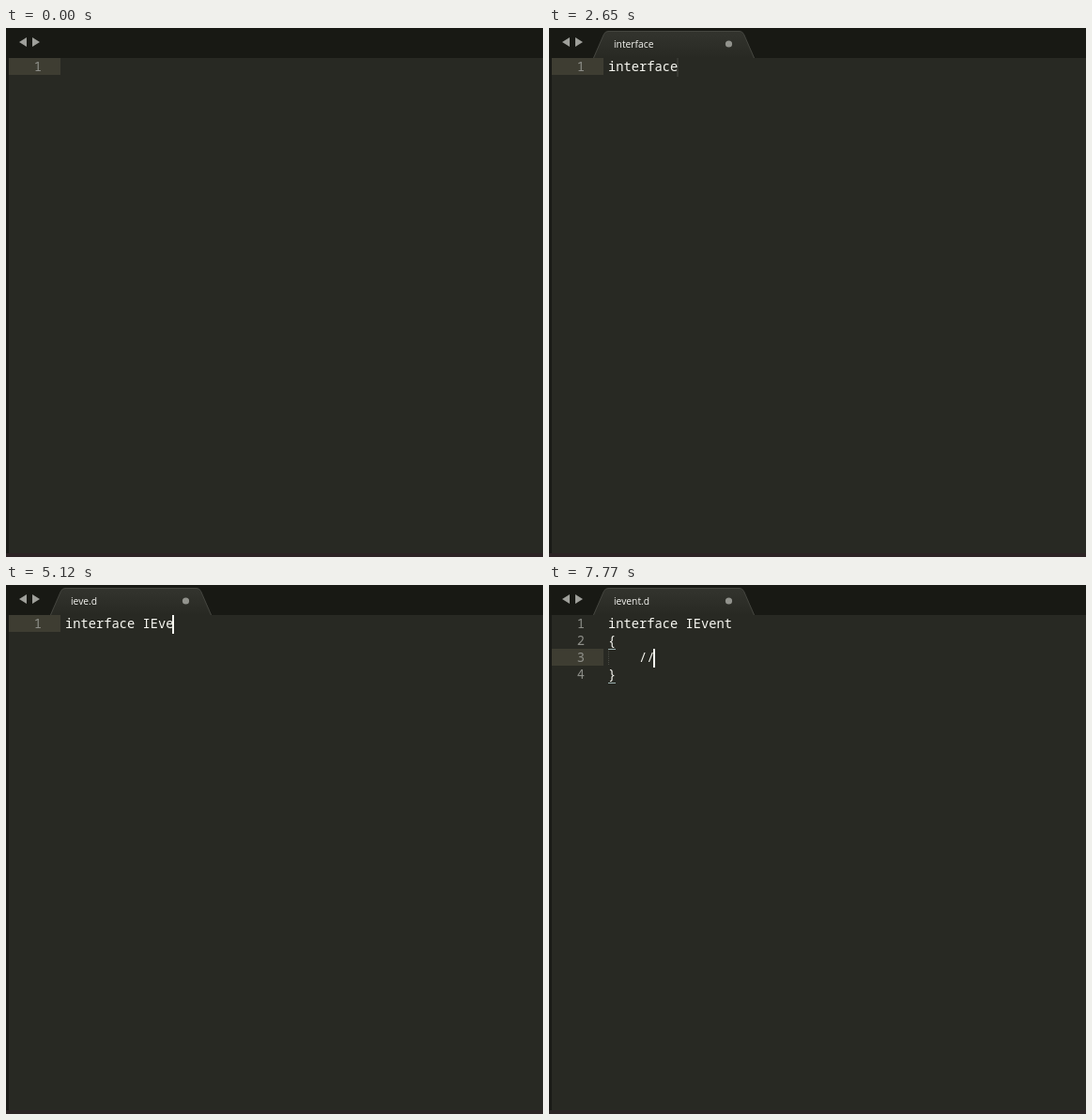
An HTML page for the animation above (8000 ms loop, 572 by 564 pixels).

```html
<!DOCTYPE html>
<html lang="en">
<head>
<meta charset="utf-8">
<title>Typing in an editor</title>
<style>
  html, body { margin: 0; width: 100%; height: 100%; overflow: hidden; background: #282923; }
  svg { display: block; width: 572px; height: 564px; }
  text { white-space: pre; }
  .code { font: 13.75px "Noto Sans Mono", "DejaVu Sans Mono", monospace; fill: #f8f8f2; }
  .num { fill: #8f908a; text-anchor: end; }
  .label { font: 10.3px "Open Sans", "Noto Sans", sans-serif; fill: #f4f4f0; }
</style>
</head>
<body>
<svg viewBox="0 0 572 564">
  <defs>
    <linearGradient id="tabFill" x1="0" y1="0" x2="0" y2="1">
      <stop offset="0" stop-color="#33342e"/>
      <stop offset="1" stop-color="#282923"/>
    </linearGradient>
  </defs>
  <rect width="572" height="564" fill="#282923"/>
  <rect width="572" height="32" fill="#181914"/>
  <rect y="32" width="3" height="532" fill="#1a1b17"/>
  <rect y="560" width="572" height="4" fill="#2c2324"/>
  <path d="M14 15L22 10V20ZM36 15L28 10V20Z" fill="#9fa09b"/>
  <g id="tab">
    <path d="M47 32L58.5 6.5Q60 3.5 63 3.5H203Q206 3.5 207.500 6.500L219 32Z" fill="url(#tabFill)"/>
    <path d="M47.500 32L58.500 6.500Q60 3.500 63 3.500H203Q206 3.500 207.500 6.500L218.500 32" fill="none" stroke="#44453f"/>
    <circle cx="191.500" cy="17" r="3.600" fill="#92938d"/>
    <text id="label" class="label" x="69" y="21"></text>
  </g>
  <rect id="active" x="3" width="55" height="18" fill="#3e3d32"/>
  <path id="guide" d="M63.5 68V86" stroke="#4a4b44" stroke-dasharray="1 1"/>
  <g id="rows"></g>
  <rect id="caret" width="2" height="20" fill="#f8f8f0"/>
</svg>
<script>
const LOOP = 8000, TOP = 32, LINE = 18, CHAR = 8.25, LEFT = 63;
const NS = "http://www.w3.org/2000/svg";
const $ = id => document.getElementById(id);

// Each edit: time, document, caret row, caret column.
const edits = [[0, "", 0, 0]];
const head = "interface IEvent";
const keyTimes = [80, 620, 920, 1080, 1230, 1550, 1780, 1940, 2100,
                  3430, 4030, 4740, 4970, 5120, 5350, 5520];
keyTimes.forEach((time, i) => edits.push([time, head.slice(0, i + 1), 0, i + 1]));
edits.push(
  [6210, head + "\n", 1, 0],
  [6610, head + "\n{}", 1, 1],
  [7220, head + "\n{\n    \n}", 2, 4],
  [7620, head + "\n{\n    /\n}", 2, 5],
  [7770, head + "\n{\n    //\n}", 2, 6]
);

// Caret blink: time since the last edit and opacity from then on.
const blink = [[0, 1], [370, 0.8], [445, 0.4], [510, 0.07], [1100, 0.45], [1180, 0.85]];

const latest = (list, t) => list.filter(item => item[0] <= t).pop();

function add(name, attrs) {
  const el = document.createElementNS(NS, name);
  for (const key in attrs) el.setAttribute(key, attrs[key]);
  return $("rows").appendChild(el);
}

function drawRows(lines) {
  $("rows").replaceChildren();
  lines.forEach((line, i) => {
    const y = TOP + i * LINE;
    add("text", { class: "code num", x: 38, y: y + 14 }).textContent = i + 1;
    add("text", { class: "code", x: LEFT, y: y + 14 }).textContent = line;
    if (/[{}]/.test(line)) {
      add("rect", { x: LEFT, y: y + LINE, width: Math.round(line.length * CHAR), height: 1, fill: "#9db1b0" });
    }
  });
}

function tabName(firstLine) {
  const [word, type] = firstLine.split(" ");
  return type ? type.toLowerCase() + ".d" : word;
}

let shown = null;

function render(t) {
  const edit = latest(edits, t);
  const [time, doc, row, col] = edit;
  if (edit !== shown) {
    shown = edit;
    const lines = doc.split("\n");
    drawRows(lines);
    $("label").textContent = tabName(lines[0]);
    $("active").setAttribute("y", TOP + row * LINE);
    $("caret").setAttribute("x", Math.round(LEFT - 1.25 + col * CHAR));
    $("caret").setAttribute("y", TOP + row * LINE);
  }
  $("caret").setAttribute("opacity", doc ? latest(blink, t - time)[1] : 0);
  $("tab").setAttribute("opacity", t < 80 ? 0 : t < 160 ? 0.5 : 1);
  $("guide").setAttribute("opacity", t < 7620 ? 0 : 1);
}

const start = performance.now();
function tick() {
  render((performance.now() - start) % LOOP);
  requestAnimationFrame(tick);
}
tick();
</script>
</body>
</html>
```
